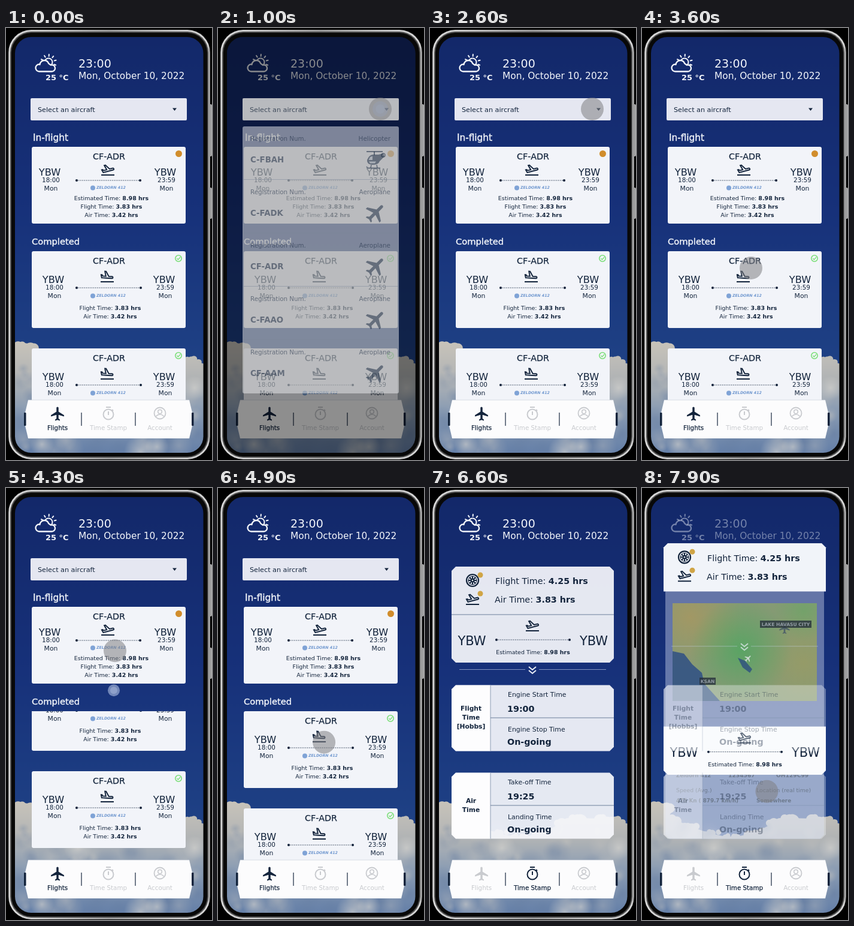
Animation, 344 px wide and 720 px high, one loop 8000 ms. Source, as an HTML page with a canvas:

```html
<!DOCTYPE html>
<html lang="en">
<head>
<meta charset="utf-8">
<title>Flight log</title>
<style>
html, body { margin: 0; width: 100%; height: 100%; overflow: hidden; background: #000; }
canvas { display: block; width: 344px; height: 720px; }
</style>
</head>
<body>
<canvas id="stage"></canvas>
<script>
const W = 344, H = 720, LOOP = 8000;
const INK = '#13243c', PALE = 'rgba(247,248,252,.92)', GREY = '#c9cbcf', WHITE = '#f2f5fa';
const canvas = document.getElementById('stage');
const dpr = window.devicePixelRatio || 1;
canvas.width = W * dpr;
canvas.height = H * dpr;
let c = canvas.getContext('2d');
c.scale(dpr, dpr);

const TAKEOFF = new Path2D('M22.07 9.64c-.21-.8-1.04-1.28-1.84-1.06L14.92 10l-6.9-6.43-1.93.51 4.14 7.17-4.97 1.33-1.97-1.54-1.45.39 2.59 4.49s7.12-1.9 16.57-4.43c.81-.23 1.28-1.05 1.07-1.85z');
const LANDING = new Path2D('M9.68 13.27l4.35 1.16 5.31 1.42c.8.21 1.62-.26 1.84-1.06.21-.8-.26-1.62-1.06-1.84l-5.31-1.42-2.76-9.02L10.12 2v8.28L5.15 8.95l-.93-2.32-1.45-.39v5.17l1.6.43z');
const PLANE = new Path2D('M21 16v-2l-8-5V3.5c0-.83-.67-1.5-1.5-1.5S10 2.67 10 3.5V9l-8 5v2l8-2.5V19l-2 1.5V22l3.5-1 3.5 1v-1.5L13 19v-5.5l8 2.5z');

const clamp = x => Math.max(0, Math.min(1, x));
const ramp = (t, a, b) => clamp((t - a) / (b - a));
const smooth = (t, a, b) => { const x = ramp(t, a, b); return x * x * (3 - 2 * x); };
const mix = (a, b, x) => a + (b - a) * x;

function group(alpha, draw, dx = 0, dy = 0) {
  if (alpha <= 0) return;
  c.save();
  c.globalAlpha *= alpha;
  c.translate(dx, dy);
  draw();
  c.restore();
}

function setFont(size, bold, italic) {
  c.font = `${italic ? 'italic ' : ''}${bold ? 'bold ' : ''}${size}px "DejaVu Sans", sans-serif`;
}

// y is the middle of the capital letters
function text(s, x, y, size, { color = INK, align = 'left', bold, italic, weight } = {}) {
  setFont(size, bold, italic);
  c.textAlign = align;
  c.fillStyle = color;
  c.fillText(s, x, y + size * 0.365);
  if (weight) {
    c.strokeStyle = color;
    c.lineWidth = weight;
    c.strokeText(s, x, y + size * 0.365);
  }
}

function labelled(label, value, x, y, size, centered) {
  setFont(size);
  const w = c.measureText(label + ' ').width;
  setFont(size, true);
  if (centered) x -= (w + c.measureText(value).width) / 2;
  text(label, x, y, size);
  text(value, x + w, y, size, { bold: true });
}

function box(x, y, w, h, color, r = 0) {
  c.fillStyle = color;
  c.beginPath();
  c.roundRect(x, y, w, h, r);
  c.fill();
}

function disc(x, y, r, color) {
  c.fillStyle = color;
  c.beginPath();
  c.arc(x, y, r, 0, 7);
  c.fill();
}

function glow(x, y, r, rgb, a) {
  const g = c.createRadialGradient(x, y, 0, x, y, r);
  g.addColorStop(0, `rgba(${rgb},${a})`);
  g.addColorStop(1, `rgba(${rgb},0)`);
  disc(x, y, r, g);
}

function ring(x, y, r, color, width = 1.5, from = 0, to = Math.PI * 2) {
  c.strokeStyle = color;
  c.lineWidth = width;
  c.beginPath();
  c.arc(x, y, r, from, to);
  c.stroke();
}

function line(points, color, width = 1) {
  c.strokeStyle = color;
  c.lineWidth = width;
  c.beginPath();
  points.forEach(([x, y]) => c.lineTo(x, y));
  c.stroke();
}

function poly(points, color) {
  c.fillStyle = color;
  c.beginPath();
  points.forEach(([x, y]) => c.lineTo(x, y));
  c.fill();
}

// Panel with chamfered corners, top and bottom chosen separately
function chamfer(x, y, w, h, color, top = 7, bottom = 7) {
  poly([[x + top, y], [x + w - top, y], [x + w, y + top], [x + w, y + h - bottom],
    [x + w - bottom, y + h], [x + bottom, y + h], [x, y + h - bottom], [x, y + top]], color);
}

function plane(x, y, scale, color, angle = 0) {
  c.save();
  c.translate(x, y);
  c.rotate(angle);
  c.scale(scale, scale);
  c.translate(-11.5, -12);
  c.fillStyle = color;
  c.fill(PLANE);
  c.restore();
}

function flightIcon(path, x, y, tilt = 0) {
  c.save();
  c.translate(x, y);
  line([[-11, 8], [11, 8]], INK, 2);
  c.rotate(tilt);
  c.translate(-12, -12);
  c.strokeStyle = INK;
  c.lineWidth = 1.9;
  c.stroke(path);
  c.restore();
}

function route(x1, x2, y) {
  c.setLineDash([1.4, 1.7]);
  line([[x1, y], [x2, y]], INK, 1.2);
  c.setLineDash([]);
  disc(x1, y, 2.1, INK);
  disc(x2, y, 2.1, INK);
}

function makeSky() {
  const off = document.createElement('canvas');
  off.width = W * 2;
  off.height = H * 2;
  const main = c;
  c = off.getContext('2d');
  c.scale(2, 2);
  let seed = 7;
  const rnd = () => (seed = seed * 16807 % 2147483647) / 2147483647;
  const blue = c.createLinearGradient(0, 0, 0, 600);
  blue.addColorStop(0, '#132869');
  blue.addColorStop(0.5, '#17317a');
  blue.addColorStop(1, '#204487');
  c.fillStyle = blue;
  c.fillRect(0, 0, W, H);

  const ridge = [[15, 522], [36, 521], [52, 543], [80, 556], [115, 568], [150, 575],
    [190, 566], [220, 550], [245, 542], [285, 543], [308, 545], [332, 552]];
  const body = c.createLinearGradient(0, 520, 0, 710);
  body.addColorStop(0, '#c9c4ba');
  body.addColorStop(0.35, '#b0b3b5');
  body.addColorStop(0.6, '#8c9db3');
  body.addColorStop(1, '#647fa8');
  c.fillStyle = body;
  c.beginPath();
  ridge.forEach(([x, y]) => c.lineTo(x, y + 8));
  c.lineTo(340, H);
  c.lineTo(0, H);
  c.fill();
  ridge.forEach(([x, y]) => {
    for (let i = 0; i < 6; i++) {
      const r = 4 + rnd() * 7;
      disc(x + (rnd() - 0.5) * 26, y + r + rnd() * 5, r, body);
    }
  });
  for (let i = 0; i < 90; i++) {
    const y = 560 + rnd() * 145;
    glow(15 + rnd() * 315, y, 8 + rnd() * 16, rnd() < 0.5 ? '208,204,196' : '100,124,160', 0.28);
  }
  [[225, 706, 28], [252, 698, 20], [60, 694, 20], [120, 600, 24], [315, 600, 20]]
    .forEach(([x, y, r]) => glow(x, y, r, '220,217,210', 0.6));
  c = main;
  return off;
}

function phone() {
  box(0, 0, W, H, '#000');
  box(338, 127, 6, 87, '#a9a9a9', 2);
  box(338, 266, 6, 52, '#a9a9a9', 2);
  const rim = c.createLinearGradient(3, 0, 341, 0);
  rim.addColorStop(0, '#8c8c8c');
  rim.addColorStop(0.01, '#dadada');
  rim.addColorStop(0.5, '#9a9a9a');
  rim.addColorStop(0.99, '#d6d6d6');
  rim.addColorStop(1, '#777');
  box(4, 3, 337, 716, rim, 38);
  box(7, 6, 331, 710, '#4c4c4c', 35);
  box(9, 8, 327, 706, '#080808', 33);
}

function weather() {
  c.lineCap = c.lineJoin = 'round';
  c.strokeStyle = WHITE;
  c.lineWidth = 2.3;
  c.beginPath();
  c.moveTo(56, 72.5);
  c.arc(55.5, 66.5, 6, Math.PI / 2, Math.PI * 1.55);
  c.arc(64, 61.5, 7.5, Math.PI * 1.02, Math.PI * 1.9);
  c.arc(76.5, 67, 5.5, Math.PI * 1.4, Math.PI * 2.5);
  c.closePath();
  c.stroke();
  ring(71, 57, 6.5, WHITE, 2, Math.PI * 1.2, Math.PI * 2.2);
  for (let i = 0; i < 6; i++) {
    const a = Math.PI * (1.12 + i * 0.2), x = Math.cos(a), y = Math.sin(a);
    line([[71 + x * 10, 57 + y * 10], [71 + x * 13, 57 + y * 13]], WHITE, 2);
  }
  c.lineCap = 'butt';
  c.lineJoin = 'miter';
  text('25 °C', 66, 82, 13, { color: WHITE, bold: true });
  text('23:00', 121, 59, 19, { color: WHITE });
  text('Mon, October 10, 2022', 121, 79, 15.4, { color: WHITE });
}

function selectBox(color) {
  box(41, 117, 261, 37, color, 2);
  text('Select an aircraft', 53, 135.5, 11.2);
  poly([[278, 133.5], [285, 133.5], [281.5, 138]], INK);
}

function stop(x, y, time) {
  text('YBW', x, y, 16.2, { align: 'center' });
  text(time, x + 2, y + 13, 10.4, { align: 'center' });
  text('Mon', x + 2, y + 27, 10.8, { align: 'center' });
}

function maker(y) {
  disc(145, y + 0.5, 4, '#7fa3d6');
  text('ZELDORN 412', 151, y, 6.3, { color: '#6f97cf', bold: true, italic: true });
}

function doneCard(y) {
  box(43, y, 257, 128, '#f2f4f9', 3);
  text('CF-ADR', 172, y + 16, 14.3, { align: 'center', weight: 0.25 });
  ring(288, y + 12, 5.2, '#7ddf7a', 1.6);
  line([[285.4, y + 12], [287.4, y + 14], [291, y + 10]], '#7ddf7a', 1.4);
  flightIcon(LANDING, 169, y + 43, -0.2);
  stop(79, y + 47, '18:00');
  stop(264, y + 47, '23:59');
  route(118, 225, y + 61);
  maker(y + 74);
  labelled('Flight Time:', '3.83 hrs', 174, y + 95, 9.5, true);
  labelled('Air Time:', '3.42 hrs', 174, y + 109, 9.5, true);
}

function flightsPage(scroll) {
  selectBox(PALE);
  text('In-flight', 45, 182, 15.3, { color: WHITE, weight: 0.4 });
  box(43, 198, 257, 128, '#f2f4f9', 3);
  text('CF-ADR', 172, 214, 14.3, { align: 'center', weight: 0.25 });
  disc(288.5, 209.5, 5.5, '#d18d2c');
  flightIcon(TAKEOFF, 170, 237);
  stop(73, 240, '18:00');
  stop(266, 240, '23:59');
  route(118, 224, 254);
  maker(266);
  labelled('Estimated Time:', '8.98 hrs', 176, 284, 9.5, true);
  labelled('Flight Time:', '3.83 hrs', 176, 298, 9.5, true);
  labelled('Air Time:', '3.42 hrs', 176, 312, 9.5, true);
  text('Completed', 43, 356, 14.7, { color: WHITE, weight: 0.4 });
  c.save();
  c.beginPath();
  c.rect(15, 372, 315, 312);
  c.clip();
  doneCard(372 - scroll);
  doneCard(534 - scroll);
  c.restore();
}

function timeCard(y, title, rows) {
  chamfer(36, y, 271, 110, PALE);
  c.save();
  c.beginPath();
  c.rect(36, y, 65, 110);
  c.clip();
  chamfer(36, y, 271, 110, '#fdfdfe');
  c.restore();
  line([[101, y], [101, y + 110]], '#8c9bb3');
  line([[101, y + 54.5], [307, y + 54.5]], '#6d809c', 1.2);
  title.forEach((s, i) =>
    text(s, 68.5, y + 54 + (i - (title.length - 1) / 2) * 15, 10.7, { align: 'center', bold: true }));
  rows.forEach(([label, value], i) => {
    text(label, 130, y + 16 + i * 58, 10.9);
    text(value, 129, y + 39 + i * 55, 14.3, { bold: true });
  });
}

function map() {
  c.save();
  c.beginPath();
  c.rect(51, 192, 241, 163);
  c.clip();
  c.fillStyle = '#8fa468';
  c.fillRect(51, 192, 241, 163);
  glow(80, 215, 90, '184,150,88', 0.7);
  glow(270, 290, 90, '166,156,90', 0.6);
  glow(165, 270, 85, '70,168,92', 0.85);
  glow(270, 205, 50, '96,170,96', 0.6);
  poly([[51, 272], [70, 276], [84, 294], [100, 308], [104, 326], [130, 355], [51, 355]], '#294b86');
  poly([[160, 283], [172, 288], [184, 302], [180, 308], [168, 299]], '#2d4f80');
  plane(238, 234, 0.9, '#445568');
  box(197, 221, 86, 12, '#26303c');
  text('LAKE HAVASU CITY', 240, 227, 7.6, { color: '#a9b2bc', align: 'center', bold: true });
  box(96, 316, 27, 12, '#26303c');
  text('KSAN', 109.5, 322, 7.6, { color: '#a9b2bc', align: 'center', bold: true });
  plane(177, 284, 0.6, '#e6e9ee', 0.8);
  c.restore();
}

function details() {
  chamfer(39, 165, 265, 420, 'rgba(200,210,232,.55)');
  map();
  const b = { bold: true };
  text('Zeldorn 412', 57, 479, 8.6, b);
  text('1234567', 144, 479, 9.2, b);
  text('OH129C99', 224, 479, 9.2, b);
  text('Speed (Avg.)', 57, 504, 9.3);
  text('Location (real time)', 191, 504, 9.3);
  text('475 Kn ( 879.7 km/h)', 57, 521, 8.8, b);
  text('Somewhere', 191, 521, 8.8, b);
}

function wheel(x, y) {
  ring(x, y, 10, INK, 2.2);
  ring(x, y, 7, INK, 1);
  for (let i = 0; i < 8; i++) {
    const a = i * Math.PI / 4;
    line([[x, y], [x + Math.cos(a) * 7, y + Math.sin(a) * 7]], INK, 2);
  }
  disc(x, y, 3, INK);
  disc(x, y, 1.2, WHITE);
}

function stampPage(p) {
  const solid = clamp(p * 2);
  group(clamp(p * 1.4), details);
  group(1, () => {
    chamfer(36, 131, 271, 80, PALE, 7, 0);
    group(solid, () => chamfer(36, 131, 271, 80, '#f1f4f9', 7, 0));
    wheel(71, 154);
    flightIcon(TAKEOFF, 71, 186);
    disc(84, 145, 4.5, '#d0a546');
    disc(84, 176, 4.5, '#d0a546');
    labelled('Flight Time:', '4.25 hrs', 109, 155, 14.3);
    labelled('Air Time:', '3.83 hrs', 108, 186, 14.3);
  }, 0, -68 * p);
  group(1 - p * 0.5, () => {
    const pale = 'rgba(205,216,240,.6)';
    line([[49, 302.5], [159, 302.5]], pale);
    line([[182, 302.5], [294, 302.5]], pale);
    [298, 304].forEach(y => line([[165, y], [171, y + 5], [177, y]], '#e8edf6', 2));
  }, 0, -68 * p);
  group(1, () => {
    chamfer(36, 211, 271, 80, PALE, 0, 7);
    group(solid, () => chamfer(36, 211, 271, 80, '#fafbfd', 0, 7));
    group(1 - solid, () => line([[36, 211], [307, 211]], '#6d809c', 1.2));
    flightIcon(TAKEOFF, 171, 230);
    text('YBW', 70, 254, 21, { align: 'center' });
    text('YBW', 273.5, 254, 21, { align: 'center' });
    route(111, 233, 253);
    labelled('Estimated Time:', '8.98 hrs', 172, 274, 9.45, true);
  }, 0, 328 * p);
  group(1 - p * 1.1, () => {
    timeCard(328.5, ['Flight', 'Time', '[Hobbs]'],
      [['Engine Start Time', '19:00'], ['Engine Stop Time', 'On-going']]);
    timeCard(474.5, ['Air', 'Time'],
      [['Take-off Time', '19:25'], ['Landing Time', 'On-going']]);
  });
}

const TABS = [
  ['Flights', 86, col => plane(86, 643, 1.15, col)],
  ['Time Stamp', 171, col => {
    ring(171, 644, 8.5, col, 2);
    line([[167, 632], [175, 632]], col, 2);
    line([[171, 639], [171, 645]], col, 2);
    line([[177, 636], [179, 638]], col, 2);
  }],
  ['Account', 257, col => {
    ring(257, 642, 9.5, col, 1.8);
    ring(257, 639.5, 3.3, col, 1.6);
    ring(257, 652, 8, col, 1.6, Math.PI * 1.2, Math.PI * 1.8);
  }]
];

function nav(stamp) {
  poly([[37, 620], [306, 620], [311, 641], [311, 663], [306, 684], [37, 684], [32, 663], [32, 641]], '#fcfcfd');
  line([[37, 620], [306, 620]], '#c5cad3', 0.6);
  box(30, 641, 3.5, 22, INK, 1);
  box(310, 641, 3.5, 22, INK, 1);
  [126, 216].forEach(x => line([[x, 641], [x, 663]], INK, 1.2));
  TABS.forEach(([name, x, icon], i) => {
    const on = [1 - stamp, stamp, 0][i];
    const paint = (col, weight) => {
      icon(col);
      text(name, x, 666, 10.3, { color: col, align: 'center', weight });
    };
    group(1 - on, () => paint(GREY));
    group(on, () => paint(INK, 0.25));
  });
}

function helicopter(x, y) {
  c.save();
  c.translate(x, y);
  line([[-14, -13], [13, -13]], INK, 1.8);
  line([[-1, -13], [-1, -7]], INK, 2);
  c.fillStyle = INK;
  c.beginPath();
  c.moveTo(-4, -8);
  c.lineTo(6, -8);
  c.lineTo(14, -10);
  c.lineTo(16, -5);
  c.lineTo(8, 3);
  c.quadraticCurveTo(6, 9, -4, 9);
  c.quadraticCurveTo(-14, 8, -13, 1);
  c.quadraticCurveTo(-10, -7, -4, -8);
  c.fill();
  poly([[-4, -5.5], [-4, 1], [-10.5, 1], [-8, -4]], '#eceef0');
  poly([[-10, 3.5], [2, 3.5], [0, 6.5], [-8, 6.5]], '#eceef0');
  ring(14, -7, 3, INK, 1.5);
  line([[-6, 9], [-7, 14]], INK, 1.6);
  line([[3, 9], [4, 14]], INK, 1.6);
  line([[-14, 12], [-12, 14.5], [9, 14.5]], INK, 1.8);
  c.restore();
}

function dropdown() {
  selectBox('#f0f2f4');
  box(41, 164, 261, 445, '#eceef0', 3);
  ['C-FBAH', 'C-FADK', 'CF-ADR', 'C-FAAO', 'CF-AAM'].forEach((reg, i) => {
    const y = 164 + i * 89;
    if (i) line([[41, y - 0.5], [302, y - 0.5]], '#7b8798');
    text('Registration Num.', 54, y + 20, 10.3);
    text(reg, 54, y + 55, 13.3, { bold: true });
    text(i ? 'Aeroplane' : 'Helicopter', 288, y + 20, 10.4, { align: 'right' });
    if (i) plane(263, y + 55, 1.7, INK, Math.PI / 4);
    else helicopter(262, y + 55);
  });
}

const visible = (t, from, to) => smooth(t, from, from + 150) - smooth(t, to, to + 150);
const finger = (x, y) => disc(x, y, 19, 'rgba(128,128,132,.55)');

function pointer(x, y, r) {
  disc(x, y, r, 'rgba(145,163,205,.75)');
  disc(x, y, r * 0.6, 'rgba(170,186,220,.5)');
}

// The list drag goes up, then sweeps down on to the tab bar
const dragUp = t => 164 * smooth(t, 3600, 4600);
const dragDown = t => 422 * smooth(t, 4600, 5250);
const LAG = 280, SCROLL = 62;

function touches(t, open) {
  group(visible(t, 350, 2750), () => finger(271, 135));
  group(visible(t, 700, 900) + visible(t, 1900, 2150), () => pointer(271, 135, 13));

  const down = dragDown(t);
  group(visible(t, 3300, 5850), () => finger(mix(182, 171, down / 422), 400 - dragUp(t) + down));
  group(visible(t, 3700, 4500), () => pointer(180, 400 - dragUp(t - LAG), 10));

  group(visible(t, 6950, LOOP), () => finger(172 + 64 * open, 303 + 356 * open));
}

const sky = makeSky();

function render(t) {
  const menu = smooth(t, 850, 1150) - smooth(t, 2150, 2450);
  const scroll = Math.max(0, Math.min(SCROLL, dragUp(t - LAG)) - dragDown(t));
  const stamp = smooth(t, 5850, 6150);
  const open = smooth(t, 7300, 8400);
  phone();
  c.save();
  c.beginPath();
  c.roundRect(15, 15, 314.5, 693, 27);
  c.clip();
  c.drawImage(sky, 0, 0, W, H);
  group(1 - open, weather);
  group(1 - stamp, () => flightsPage(scroll));
  group(stamp, () => stampPage(open));
  nav(stamp);
  group(menu, () => {
    box(0, 0, W, H, 'rgba(0,0,0,.87)');
    dropdown();
  });
  touches(t, open);
  c.restore();
}

const start = performance.now();
function tick() {
  render((performance.now() - start) % LOOP);
  requestAnimationFrame(tick);
}
tick();
</script>
</body>
</html>
```
